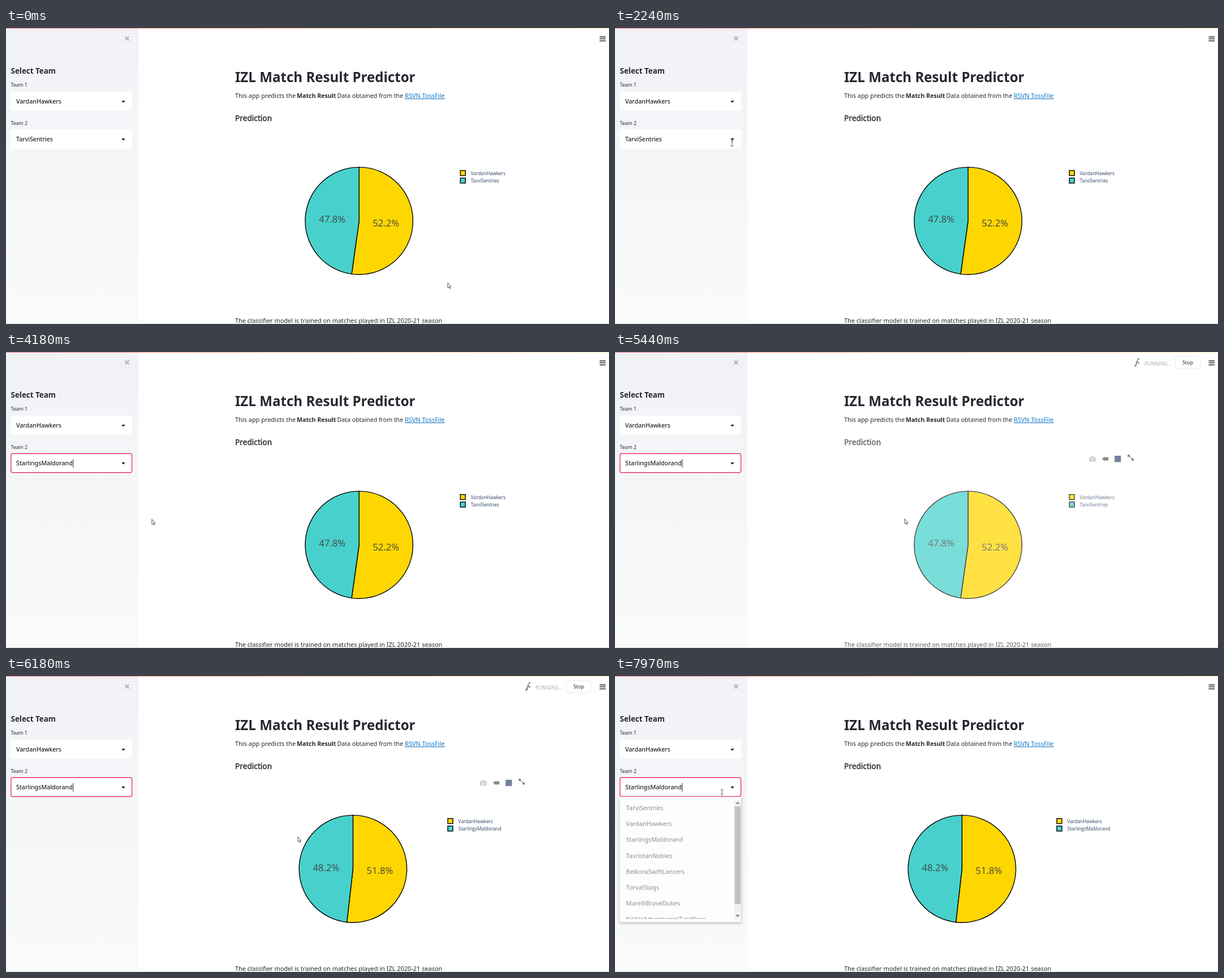
Recreate the animation shown at these times as an HTML page. Size 1066 by 525 pixels, loop 8 s.

```html
<!DOCTYPE html>
<html lang="en">
<head>
<meta charset="utf-8">
<title>Match Result Predictor</title>
<style>
  html, body { margin: 0; width: 100%; height: 100%; overflow: hidden; background: #fff; }
  svg { display: block; width: 1066px; height: 525px; font: 10.8px "Noto Sans", "Open Sans", sans-serif; fill: #262730; }
  .bold { font-weight: 700; }
  .label { font-size: 8.7px; }
  .legend { font: 8.36px "Open Sans", "Noto Sans", sans-serif; fill: #2a3f5f; }
  .share { font: 16.7px "Open Sans", "Noto Sans", sans-serif; fill: #444; text-anchor: middle; }
  .line { fill: none; stroke: #262730; }
</style>
</head>
<body>
<svg viewBox="0 0 1066 525">
  <defs>
    <linearGradient id="side" x2="0" y2="1">
      <stop stop-color="#f0f2f6"/><stop offset="1" stop-color="#fafafa"/>
    </linearGradient>
    <linearGradient id="strip">
      <stop stop-color="#f2667f"/><stop offset=".6" stop-color="#ffc78c"/><stop offset="1" stop-color="#fff3a0"/>
    </linearGradient>
    <clipPath id="rows"><rect x="8" y="219" width="203" height="212"/></clipPath>
    <filter id="shadow" x="-20%" y="-20%" width="140%" height="140%">
      <feDropShadow dx="0" dy="2" stdDeviation="2.8" flood-opacity=".3"/>
    </filter>
  </defs>

  <rect width="1066" height="525" fill="#fff"/>
  <rect width="234" height="525" fill="url(#side)"/>
  <rect width="1066" height="1" fill="url(#strip)"/>
  <rect y="524" width="1066" height="1" fill="#d6d6d6"/>

  <path class="line" d="M210.5 15l7 7m0-7l-7 7" stroke-width="2.3" style="stroke:#b4b6bb"/>
  <path class="line" d="M1049.5 15.8h10.5m-10.5 3.5h10.5m-10.5 3.5h10.5" stroke-width="1.5"/>

  <text class="bold" x="8.5" y="80.5" font-size="13.4">Select Team</text>
  <text class="label" x="8.5" y="104.3">Team 1</text>
  <text class="label" x="8.5" y="172">Team 2</text>
  <rect x="8.5" y="112.8" width="214.3" height="34.2" rx="3" fill="#fff"/>
  <rect id="box" x="8.8" y="180.2" width="213.8" height="33.6" rx="3" fill="#fff" stroke-width="1.4"/>
  <path d="M204.3 129h6.4l-3.2 3.4zM204.3 196h6.4l-3.2 3.4z" fill="#000"/>
  <text id="pick1" x="18" y="134.3" fill="#000"></text>
  <text id="pick2" x="18" y="201.3" fill="#000"></text>
  <path id="caret" class="line" d="M0 190v15"/>

  <text class="bold" x="405" y="96" font-size="24.1">IZL Match Result Predictor</text>
  <text x="405" y="124" font-size="10.95">This app predicts the</text>
  <text class="bold" x="514" y="124" font-size="10.6">Match Result</text>
  <text x="585.5" y="124" font-size="10.6">Data obtained from the</text>
  <text x="705" y="124" font-size="10.95" fill="#1577c4" text-decoration="underline">RSVN TossFile</text>

  <g id="stale">
    <text x="405" y="165" font-size="13.7" stroke="#262730" stroke-width=".35">Prediction</text>
    <g id="chart1"></g>
    <g id="chart2"></g>
    <text x="405" y="522.6" font-size="10.95">The classifier model is trained on matches played in IZL 2020-21 season</text>
  </g>

  <g id="tools" fill="#8b8b8b">
    <path d="M838 186.5h3l1.2-2h3.2l1.2 2h3v8h-11.6z" fill="#cdcdcd"/>
    <circle cx="843.8" cy="190.3" r="2.4" fill="#cdcdcd" stroke="#fff"/>
    <path d="M861 189.5l3.2-3h8v6h-8z"/>
    <rect x="883.2" y="184" width="11.2" height="11.2" fill="#75829b"/>
    <path d="M906.3 182.3h4.2l-1.4 1.4 2.2 2.2-1.3 1.3-2.2-2.2-1.5 1.5zM916.8 192.4h-4.2l1.4-1.4-2.2-2.2 1.3-1.3 2.2 2.2 1.5-1.5z" fill="#707070"/>
  </g>

  <g id="status">
    <g fill="none" stroke="#85878f" stroke-width="1.7" stroke-linecap="round" stroke-linejoin="round">
      <path id="runner"/>
      <path id="wheels" d="M924.3 15.5l-2 4.2h4.6l-1 4.3M919 16l2.5-1.5 2.8 1M919.5 18.8a3.6 3.6 0 1 0 4.5 4.8"/>
    </g>
    <circle cx="925.3" cy="12.5" r="1.7" fill="#85878f"/>
    <text x="936" y="24" font-size="8.7" fill="#a9adb8">RUNNING...</text>
    <rect x="990" y="8.5" width="44.7" height="20.7" rx="3" fill="#fff" stroke="#e9eaee"/>
    <text x="1003" y="22" font-size="8.9">Stop</text>
  </g>

  <g id="menu">
    <rect x="8.3" y="214.3" width="214.7" height="222" rx="2" fill="#fdfdfd" filter="url(#shadow)"/>
    <rect id="hover" x="8.3" y="219.7" width="203" height="28" fill="#f0f0f5"/>
    <g id="items" clip-path="url(#rows)" fill="#8c8d9c" font-size="10.9"></g>
    <rect x="211" y="219.7" width="11.7" height="211.5" fill="#f1f1f1"/>
    <rect x="211.5" y="231.5" width="10.6" height="173" fill="#c1c1c1"/>
    <path class="line" d="M214.3 226.7l2.5-2.5 2.5 2.5M214.3 423.6l2.5 2.5 2.5-2.5" stroke-width="1.1"/>
  </g>

  <g id="cursor" fill="#fff" stroke="#444" stroke-width=".9" stroke-linejoin="round">
    <path id="arrow" d="M0 0v9l2-1.8 1.5 3.1 1.4-.7-1.4-2.9h2.4z"/>
    <path id="beam" fill="none" d="M-2.2-4.7q1.7 0 2.2.8.5-.8 2.2-.8M0-3.9v7.8M-2.2 4.7q1.7 0 2.2-.8.5.8 2.2.8"/>
    <path id="hand" d="M-1 .9q1-1.8 2 0v3.2l4 .9q1 .3.9 1.4l-.7 3.1-.8 2.5h-4.7l-3-3.9q-1-1.5.3-1.6l2 1.3z"/>
  </g>
</svg>
<script>
const $ = id => document.getElementById(id);
const LOOP = 8000;
const OPEN = 2310, PICK = 3850, RUN = 4400, STALE = 4865, RESULT = 6150, DONE = 6300, REOPEN = 7600;
const teams = ["TarviSentries", "VardanHawkers", "StarlingsMaldorand", "TavristanNobles",
  "BelkoraSwiftLancers", "TorvalStags", "MarelliBraveDukes", "NobleAdventurersTandilore"];
const colors = ["#ffd700", "#48d1cc"];

// pointer moves: start, end, target x, target y
const moves = [
  [0, 360, 206, 173], [440, 1020, 106, 68], [1040, 1440, 147, 186], [1500, 2170, 207, 205],
  [2300, 2940, 182, 247], [2940, 3640, 112, 297], [4040, 4890, 512, 296], [5440, 5740, 516, 285],
  [6570, 6960, 57, 238], [6960, 7430, 189, 206]
];

const show = (id, on) => $(id).setAttribute("visibility", on ? "visible" : "hidden");
const fade = (id, v) => $(id).setAttribute("opacity", v);
const within = (t, a, b) => t >= a && t < b;
const clamp = v => Math.max(0, Math.min(1, v));
const easeOut = p => 1 - (1 - p) ** 2.5;

function drawChart(id, cx, legendX, rivals, share) {
  const cy = 342.1, r = 95.2, turn = share / 50 * Math.PI;
  const at = (angle, d) => [cx + d * Math.sin(angle), cy - d * Math.cos(angle)];
  let from = 0;
  const parts = [turn, 2 * Math.PI - turn].map((size, i) => {
    const to = from + size, [lx, ly] = at(from + size / 2, r / 2);
    const percent = (i ? 100 - share : share).toFixed(1);
    const part = `
      <path d="M${cx} ${cy}L${at(from, r)}A${r} ${r} 0 ${1 - i} 1 ${at(to, r)}z"
        fill="${colors[i]}" stroke="#000" stroke-width="1.4" stroke-linejoin="round"/>
      <text class="share" x="${lx}" y="${ly + 6.5}">${percent}%</text>
      <rect x="${legendX + .7}" y="${252.7 + i * 13.4}" width="9" height="9"
        fill="${colors[i]}" stroke="#000" stroke-width="1.4"/>
      <text class="legend" x="${legendX + 19.3}" y="${260.5 + i * 13.4}">${rivals[i]}</text>`;
    from = to;
    return part;
  });
  $(id).innerHTML = parts.join("");
}

function pointerAt(t) {
  let x = 785, y = 454;
  for (const [start, end, tx, ty] of moves) {
    const p = easeOut(clamp((t - start) / (end - start)));
    x += (tx - x) * p;
    y += (ty - y) * p;
  }
  return [x, y];
}

// two-segment arm or leg
function limb(x, y, a, b, len) {
  const step = angle => `l${len * Math.sin(angle)} ${len * Math.cos(angle)}`;
  return `M${x} ${y}${step(a)}${step(b)}`;
}

function drawRunner(t) {
  const swing = .9 * Math.cos((t - RUN) / 60);
  const sides = [swing, -swing].map(s =>
    limb(921.5, 19, s, s - .6, 3.4) + limb(923.5, 15.3, -s, .9 - s, 2.8));
  $("runner").setAttribute("d", "M923.5 15.3l-2 3.7" + sides.join(""));
}

function drawStatus(t) {
  const running = within(t, RUN, DONE);
  const seated = Math.floor((t - RUN) / 260) % 2 === 1;
  show("status", running);
  show("runner", running && !seated);
  show("wheels", running && seated);
  drawRunner(t);
}

function drawSelect(t) {
  const focus = t >= OPEN, picked = t >= PICK;
  const open = within(t, OPEN, PICK) || t >= REOPEN;
  $("box").setAttribute("stroke", focus ? "#e8356a" : "#fff");
  $("pick2").textContent = teams[picked ? 2 : 0];
  $("caret").setAttribute("transform", `translate(${19 + $("pick2").getComputedTextLength()})`);
  show("caret", focus && (t + 50) % 1000 < 500);
  show("menu", open);
  show("hover", open && !picked);
  return open;
}

function drawPointer(t, open) {
  const [x, y] = pointerAt(t);
  const inSide = within(x, 8, 223);
  const onList = open && inSide && within(y, 214, 436);
  const onBox = inSide && (within(y, 113, 147) || within(y, 180, 214));
  $("cursor").setAttribute("transform", `translate(${x} ${y})`);
  show("hand", onList);
  show("beam", onBox);
  show("arrow", !onList && !onBox);
}

function render(t) {
  const waiting = within(t, STALE, RESULT);
  const hovered = within(t, 60, 300) || t >= 4500;
  show("chart1", t < RESULT);
  show("chart2", t >= RESULT);
  fade("stale", waiting ? 1 - .67 * clamp((t - STALE) / 1000) ** 1.65 : 1);
  fade("tools", hovered ? clamp((7100 - t) / 250) : 0);
  drawStatus(t);
  drawPointer(t, drawSelect(t));
}

drawChart("chart1", 624.2, 802.5, [teams[1], teams[0]], 52.2);
drawChart("chart2", 613.4, 780.3, [teams[1], teams[2]], 51.8);
$("items").innerHTML = teams.map((name, i) => `<text x="19.6" y="${238 + i * 28.2}">${name}</text>`).join("");
$("pick1").textContent = teams[1];

const start = performance.now();
function tick() {
  render((performance.now() - start) % LOOP);
  requestAnimationFrame(tick);
}
tick();
</script>
</body>
</html>
```
